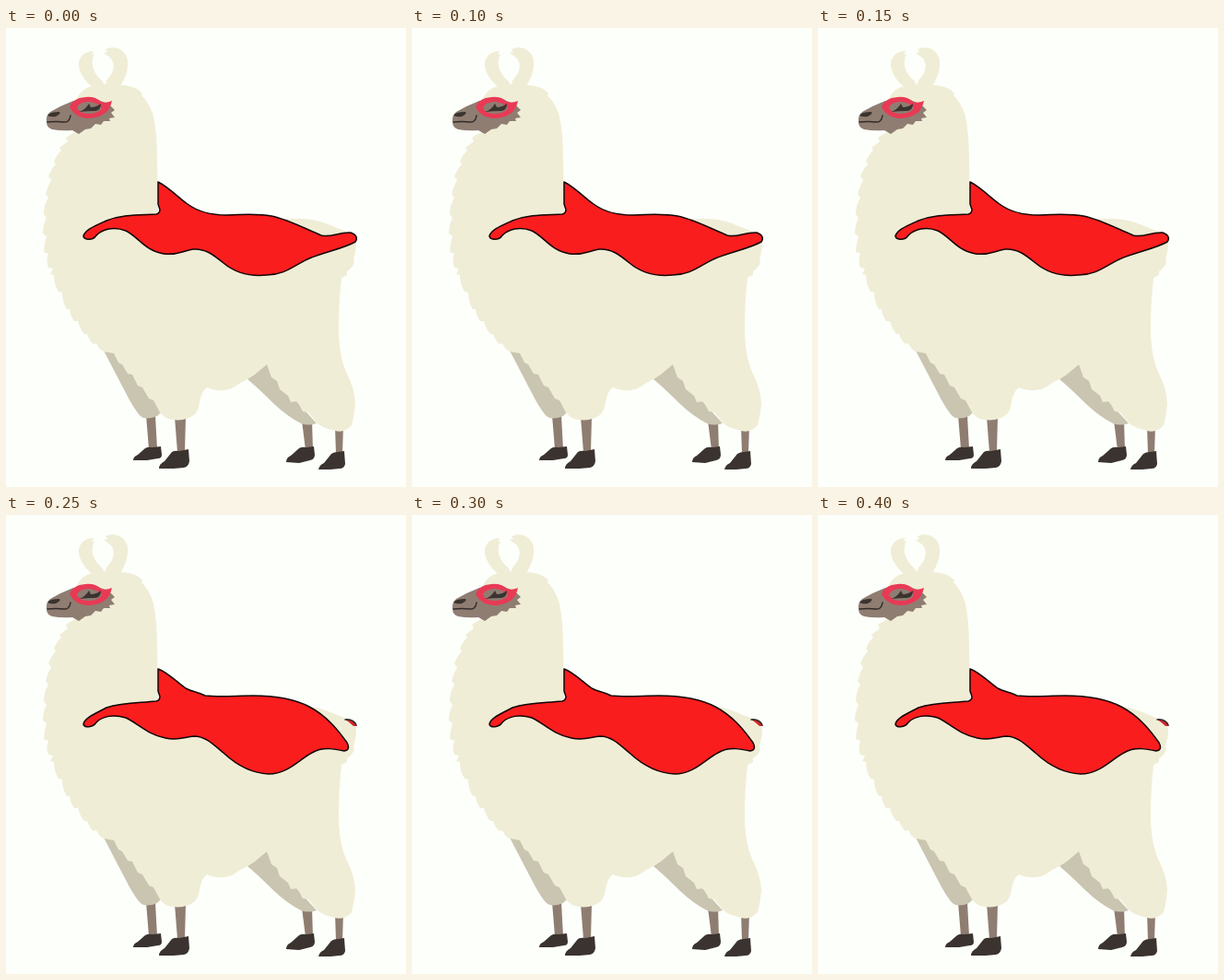
Recreate the animation shown at these times as an HTML page. Size 434 px wide and 498 px high, loop 0.45 s.

```html
<!DOCTYPE html>
<html lang="en">
<head>
<meta charset="utf-8">
<title>Caped llama</title>
<style>
  html, body { margin: 0; width: 100%; height: 100%; overflow: hidden; background: #fdfffb; }
  svg { display: block; width: 434px; height: 498px; }
  .wool { fill: #f0edd6; }
  .shade { fill: #c9c5b0; }
  .skin { fill: #8f7d72; }
  .dark { fill: #3a332f; }
  .line { fill: none; stroke: #332c2a; stroke-linecap: round; }
  .cape { fill: #fa1d1e; stroke: #120606; stroke-width: 1.5; stroke-linejoin: round; }
</style>
</head>
<body>
<svg viewBox="0 0 434 498">
  <!-- legs and hooves -->
  <path class="skin" d="M152 420H162L164 457H155ZM183 422H195L194 460H186ZM321 426H332L333 458H325ZM357 432H366L365 462H358Z"/>
  <path class="dark" d="M138 469Q138 465 143 463L151 456Q154 454 159 455L168 454L169 463Q169 467 165 467L153 469Z
    M166 478Q166 473 172 470L180 460Q183 458 188 459L198 457L199 470Q198 476 193 477L182 478Z
    M304 471Q304 466 309 464L318 456Q321 454 326 455L334 454L335 463Q335 468 330 469L318 472Z
    M339 479Q340 474 345 472L353 462Q356 460 360 460L367 459L368 473Q367 478 362 478L352 479Z"/>

  <!-- shaded far legs -->
  <path class="shade" d="M106 350L122 352L170 415L164 421Q150 427 144 419Q137 410 130 396Q119 375 106 350Z
    M262 381L284 364L296 384L337 429Q328 432 320 429Q306 422 291 408Q275 392 262 381Z"/>

  <!-- ears -->
  <path class="wool" d="M96 66C83 56 78 45 79 37C81 29 87 25 95 25L93 29L96 28C91 38 94 49 105 58L108 66Z
    M107 66L109 57C118 48 119 38 113 32L106 27L110 26L108 23C120 18 130 25 132 35C133 48 128 57 122 66Z"/>

  <!-- body -->
  <path class="wool" d="M76 78Q82 65 94 63Q110 59 126 62Q142 63 148 71L147 73Q156 82 160 96Q164 115 164 145L165 199
    L215 205L306 207Q332 206 347 212L367 220Q378 225 380 232Q380 243 377 250L378 255Q374 262 370 264L370 268L364 271
    Q361 300 361 325Q361 355 369 373Q379 393 379 408Q378 420 375 431Q366 441 354 436Q343 434 337 428
    L328 417L322 416L316 405L309 406L306 399L297 392L294 383L288 379L283 365L270 376L262 381Q253 385 247 390Q240 394 232 393Q224 393 218 390
    Q212 394 210 406Q209 414 205 419Q195 427 181 425Q172 424 167 417
    L160 404L155 402L148 390L143 388L137 376L132 375L126 365L122 363L117 353L106 351
    Q101 349 98 342L95 343Q91 340 88 332L85 332Q80 326 78 318L74 318Q70 313 69 305L66 305Q61 297 61 287L57 286
    Q52 278 52 268L48 267L51 261L46 260Q43 253 46 245L41 243Q41 235 44 226L40 223Q40 214 44 206L41 202Q41 192 46 184
    L43 180Q45 172 49 165L46 161Q49 153 54 148L52 145Q55 137 60 133L58 130Q63 126 67 123L65 119Q70 115 78 112Z"/>

  <!-- face -->
  <path class="skin" d="M44 102Q43 95 48 91Q60 84 73 79L100 78L112 83L118 89L114 92L118 97L112 98L113 101L106 101L103 105L97 104L92 109L86 110L79 115L72 111Q60 112 50 110Q44 108 44 102Z"/>
  <path class="dark" d="M45 95Q47 91 58 91Q60 93 54 96Q49 97 45 95Z"/>
  <path class="line" stroke-width="1.5" d="M45 102Q55 101 62 102Q69 103 70 95"/>
  <path fill="#e83a55" fill-rule="evenodd" d="M69 86Q72 76 86 75Q97 74 103 80Q109 82 115 79Q113 88 108 92Q100 98 88 98Q75 97 69 86Z
    M77 86Q79 93 89 93Q100 93 104 87Q100 81 90 80Q80 80 77 86Z"/>
  <path class="dark" d="M79 91Q86 89 90 82L92 86Q98 86 103 82Q103 89 97 90Q88 90 79 91Z"/>

  <!-- cape poses -->
  <path id="raised" class="cape" d="M165 167C177 173 188 185 197 191C209 200 223 203 240 203C256 202 273 201 288 204
    C307 208 325 218 342 225C353 228 361 221 374 222C380 224 382 228 379 232C367 239 346 243 329 250
    C313 257 303 268 283 268C263 270 248 265 236 255C225 246 216 239 203 240C191 242 185 247 171 245
    C151 242 143 226 130 220C117 215 105 218 98 225C94 231 85 230 84 226C85 219 98 214 109 209
    C127 202 145 203 163 202Q167 201 167 197L165 191Z"/>
  <g id="lowered">
    <path fill="#d8232a" d="M368 222Q377 221 381 229L377 229Q373 225 368 222Z"/>
    <path class="line" stroke-width="1.5" d="M368 222Q377 221 380 228"/>
    <path class="cape" d="M165 167C176 171 186 182 195 188C202 192 209 192 216 196C233 198 249 196 268 196
      C291 196 312 199 329 208C348 218 360 233 370 247Q374 255 367 256C358 254 344 251 332 258
      C318 265 306 281 285 281C265 280 250 271 237 259C226 250 217 240 204 240C193 241 187 245 173 242
      C153 238 143 226 130 220C117 216 105 218 98 225C94 231 85 231 84 227C85 220 98 215 109 209
      C127 203 145 204 163 202Q167 201 167 197L165 191Z"/>
  </g>
</svg>
<script>
  const LOOP = 450, DROP = 250;
  const raised = document.getElementById("raised");
  const lowered = document.getElementById("lowered");
  const start = performance.now();

  function draw(now) {
    const isLowered = Math.max(0, now - start) % LOOP >= DROP;
    raised.style.display = isLowered ? "none" : "";
    lowered.style.display = isLowered ? "" : "none";
    requestAnimationFrame(draw);
  }
  draw(start);
</script>
</body>
</html>
```
